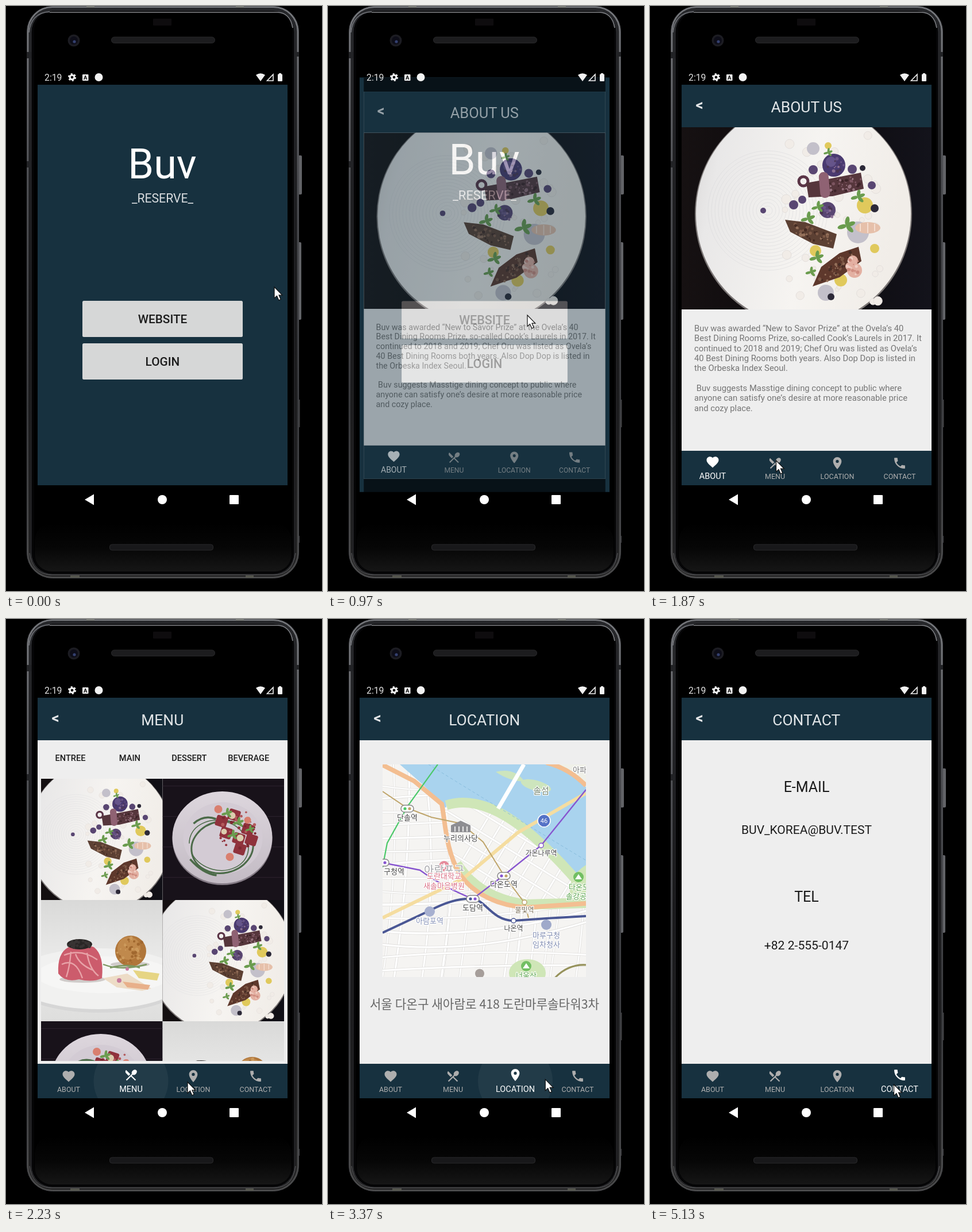
Write an HTML page that moves like this. It is 550x1018 px and loops after 5410 ms.

```html
<!DOCTYPE html>
<html lang="en">
<head>
<meta charset="utf-8">
<title>Restaurant app</title>
<style>
html, body { margin: 0; width: 100%; height: 100%; overflow: hidden; background: #000; }
svg { display: block; }
#stage { width: 550px; height: 1018px; font-family: Roboto, sans-serif; }
.mid { text-anchor: middle; }
.kr { font-family: "Noto Sans CJK KR", "Noto Sans CJK", sans-serif; text-anchor: middle; }
.halo { font-weight: 500; paint-order: stroke; stroke: #fff; stroke-width: 2.5px; stroke-linejoin: round; }
</style>
</head>
<body>
<svg id="stage" viewBox="0 0 550 1018"></svg>
<script>
const LOOP = 5410;
const NAVY = '#17313f', PAGE = '#eeeeee';
const ISLE = 'M205 318C270 296 345 345 449 468V500L345 497C290 490 250 465 222 425C206 392 210 350 205 318Z';
const stage = document.getElementById('stage');

// ---------- drawing helpers ----------
const rect = (x, y, w, h, fill, more = '') =>
  `<rect x="${x}" y="${y}" width="${w}" height="${h}" fill="${fill}" ${more}/>`;
const dot = (x, y, r, fill, more = '') => `<circle cx="${x}" cy="${y}" r="${r}" fill="${fill}" ${more}/>`;
const oval = (x, y, rx, ry, fill, more = '') =>
  `<ellipse cx="${x}" cy="${y}" rx="${rx}" ry="${ry}" fill="${fill}" ${more}/>`;
const shape = (d, fill, more = '') => `<path d="${d}" fill="${fill}" ${more}/>`;
const line = (d, color, w, more = '') =>
  `<path d="${d}" fill="none" stroke="${color}" stroke-width="${w}" ${more}/>`;
const text = (s, x, y, size, fill, more = 'class="mid"') =>
  `<text x="${x}" y="${y}" font-size="${size}" fill="${fill}" ${more}>${s}</text>`;
const dots = (fill, list) => list.map(([x, y, r]) => dot(x, y, r, fill)).join('');
const leaf = (x, y, size = 7) => [-80, -20, 45, 165].map(a =>
  oval(x + size * .8, y, size * .8, size * .38, '#6a9c4e', `transform="rotate(${a} ${x} ${y})"`)).join('');
const grad = (id, stops, dir = 'x2="0" y2="1"') =>
  `<linearGradient id="${id}" ${dir}>${stops.map(([o, c]) => `<stop offset="${o}" stop-color="${c}"/>`).join('')}</linearGradient>`;
const times = (n, f) => Array.from({ length: n }, (_, i) => f(i)).join('');
// A window onto part of a drawing; everything outside the box is cut off.
const crop = (x, y, w, h, id, box) =>
  `<svg x="${x}" y="${y}" width="${w}" height="${h}" viewBox="${box}" preserveAspectRatio="xMidYMin slice"><use href="#${id}"/></svg>`;

function random(seed) {
  return () => (seed = (seed * 16807) % 2147483647) / 2147483647;
}

// Small specks scattered inside a tilted ellipse.
function crumbs(seed, x, y, rx, ry, tilt, colors, n = 40) {
  const rnd = random(seed);
  const specks = times(n, i => {
    const a = rnd() * 6.283, d = Math.sqrt(rnd());
    return dot(Math.cos(a) * d * rx, Math.sin(a) * d * ry, 1 + rnd() * 2, colors[i % colors.length]);
  });
  return `<g transform="translate(${x} ${y}) rotate(${tilt})">${specks}</g>`;
}

// ---------- phone ----------
function phone() {
  return rect(508, 260, 7, 68, '#626367', 'rx="2"') + rect(508, 411, 6, 135, '#626367', 'rx="2"')
    + rect(508, 685, 3.5, 48, '#3c3c3e') + rect(508, 922, 3, 12, '#3c3c3e')
    + rect(36.5, .5, 473, 995, 'url(#rim)', 'rx="44" stroke="#4a4b4f"')
    + rect(39.5, 3, 467, 990, 'url(#side)', 'rx="41"')
    + rect(44, 8, 458, 981, '#050506', 'rx="37" stroke="#303135"')
    + rect(49, 11, 449, 972, '#000', 'rx="32"')
    + rect(50, 900, 447, 84, 'url(#chin)', 'rx="30"')
    + line('M76 11H472C486 11 496 20 499 38', '#85878b', 1.6)
    + line('M40 46C42 24 54 11 76 10', '#6b6d72', 2)
    + line('M41 952C44 977 58 989 78 990H468C488 989 501 977 504 952', '#4b4b4d', 1.5)
    + [80, 270].map(y => rect(36, y, 8, 11, '#222326')).join('') + rect(503, 80, 7, 8, '#222326')
    + [140, 400].map(x => rect(x, 0, 14, 3, '#7a7c78')).join('')
    + rect(112, 991, 16, 4, '#55564e') + rect(417, 991, 14, 4, '#55564e')
    + rect(256, 22, 32, 12, '#0e0c0e', 'rx="1"')
    + dot(118, 60, 10.5, '#1c1c22') + dot(118, 60, 7, '#0d0d18') + dot(119, 62, 2.6, '#34406f')
    + rect(183.5, 54, 180, 10.5, '#1c1c1e', 'rx="5" stroke="#29292b"')
    + rect(180.5, 937, 180, 10, '#18181a', 'rx="4" stroke="#29292b"');
}

function systemBars() {
  const white = '#f2f2f2';
  return text('2:19', 67, 130, 15.8, '#e2e2e2', '')
    + `<circle cx="115" cy="124" r="3.8" fill="none" stroke="${white}" stroke-width="3"/>`
    + `<circle cx="115" cy="124" r="6" fill="none" stroke="${white}" stroke-width="2.2" stroke-dasharray="3.1 3.18"/>`
    + rect(133, 119, 10.5, 11, white, 'rx="1"') + text('A', 138.2, 128, 9.5, '#000', 'class="mid" font-weight="700"')
    + dot(161.5, 124, 7, white)
    + shape('M435 120Q443 114.5 451 120L443 131Z', white)
    + line('M465 119V130H454.5Z', white, 1.6)
    + rect(473, 118.5, 8, 12.5, white, 'rx="1"') + rect(475, 117, 4, 2, white)
    + shape('M137 859L153 849.5V868.5Z', '#fff') + dot(272, 859, 8, '#fff') + rect(389, 851, 16, 16, '#fff', 'rx="1"');
}

// ---------- home ----------
function home() {
  const button = (y, label, id) => rect(133, y, 279, 63, '#d6d7d7', 'rx="2.5"')
    + (id ? rect(133, y, 279, 63, '#000', `rx="2.5" id="${id}" opacity="0"`) : '')
    + text(label, 272.5, y + 39, 20.8, '#1c1c1c', 'class="mid" font-weight="500"');
  return rect(55, 137, 435, 697, NAVY)
    + text('Buv', 272, 300, 72, '#fff')
    + text('_RESERVE_', 272.5, 342, 21.2, '#d8dcdf')
    + button(513, 'WEBSITE', 'press') + button(587, 'LOGIN');
}

// ---------- dishes ----------
function purpleDish() {
  const rnd = random(11);
  const purples = ['#6b5687', '#4b3653', '#8a6f92'], browns = ['#7c5846', '#452c24', '#94705a'];
  return rect(55, 211, 435, 317, 'url(#table)')
    + oval(267, 362, 189, 196, '#7b7675') + oval(267, 361, 187, 194, 'url(#plate)')
    + times(17, i => `<circle cx="205" cy="356" r="${8 + i * 6}" fill="none" stroke="#d6d6d8" stroke-width=".8" opacity=".6"/>`)
    + times(40, () => dot(235 + rnd() * 165, 225 + rnd() * 290, 3 + rnd() * 6, '#f1ece7', 'stroke="#e4dfdc"'))
    + dots('#c3c0ca', [[284, 248, 11], [362, 394, 19], [306, 499, 14]])
    + dots('#e0c95c', [[310, 243, 6], [374, 347, 14], [391, 422, 8], [288, 426, 10], [332, 477, 11]])
    + dots('#594672', [[284, 285, 8], [352, 284, 8], [386, 312, 7], [250, 346, 8], [265, 337, 7], [309, 355, 14], [197, 356, 5]])
    + dot(267, 305, 8, 'none', 'stroke="#5b3547" stroke-width="5"')
    + dot(320, 277, 20, '#4a3a70') + dot(315, 271, 9, '#65548a')
    + shape('M272 308L316 300L367 290L372 318L318 331L276 333Z', '#56363c')
    + crumbs(3, 338, 311, 32, 13, -12, ['#7c5560', '#3d2428', '#94707c'])
    + crumbs(4, 312, 357, 14, 12, 0, purples, 16) + crumbs(6, 322, 277, 17, 16, 0, purples, 14)
    + rect(295, 289, 17, 45, '#8f6273', 'rx="8" transform="rotate(-5 303 311)"')
    + shape('M235 372L270 376L325 397L319 422L284 414L244 393Z', '#5c4033')
    + crumbs(7, 281, 396, 38, 12, 20, browns)
    + shape('M283 488L298 454L330 430L363 419L368 444L330 472Z', '#5e382c')
    + crumbs(8, 325, 455, 40, 11, -40, browns)
    + oval(379, 386, 22, 10, '#e6c0aa') + line('M366 379V392M379 377V395M391 379V392', '#f4ddd0', 2)
    + dots('#e3b0a2', [[353, 443, 9], [356, 460, 13], [347, 453, 7]])
    + crumbs(9, 354, 453, 12, 16, 0, ['#f0cfc4', '#cf8d80'], 16)
    + dots('#2c2938', [[391, 352, 7], [315, 506, 6], [370, 282, 5]])
    + leaf(342, 382, 10) + leaf(275, 370, 8) + leaf(290, 438, 8) + leaf(362, 332, 8) + leaf(310, 255, 5) + leaf(292, 350, 7) + leaf(280, 463, 6);
}

function beetDish() {
  const beets = ['#7d2831', '#b35a5c', '#96343f'];
  return rect(0, 0, 212, 212, '#18121a') + times(4, i => rect(0, 12 + i * 53, 212, 1.2, '#2a202b'))
    + oval(104, 105, 87, 80, '#857c86') + oval(104, 102, 87, 80, 'url(#plate2)') + oval(105, 103, 69, 62, '#d3cbd4')
    + oval(104, 119, 54, 45, 'none', 'stroke="#4b6a48" stroke-width="3" transform="rotate(-12 104 119)"')
    + oval(98, 116, 52, 43, 'none', 'stroke="#4b6a48" stroke-width="1.6" stroke-dasharray="120 20" transform="rotate(14 98 116)"')
    + line('M54 78Q72 62 93 70M48 140Q70 165 94 168', '#4b6a48', 3.5)
    + [[96, 62], [118, 51], [126, 92], [142, 76], [104, 82], [148, 94], [128, 110]].map(([x, y]) =>
      rect(x, y, 20, 19, '#8f323c', `rx="3" transform="rotate(18 ${x} ${y})"`)).join('')
    + crumbs(13, 130, 88, 32, 36, 0, beets)
    + dots('#d97f6f', [[97, 53, 7], [117, 136, 7], [148, 72, 6]])
    + dots('#dccdae', [[121, 64, 6], [107, 92, 5], [135, 103, 6]])
    + leaf(112, 60, 6) + leaf(132, 76, 6) + leaf(122, 98, 6) + leaf(152, 88, 5);
}

function beefDish() {
  const rnd = random(5);
  return rect(0, 0, 212, 212, 'url(#wall)')
    + oval(100, 143, 150, 53, '#d6d6d6') + oval(100, 137, 150, 53, '#f1f1f0')
    + oval(110, 130, 118, 32, '#f6f6f5')
    + oval(72, 138, 40, 6, '#cfcbc9') + oval(155, 112, 34, 5, '#cfcbc9')
    + shape('M30 128Q28 92 48 82Q70 74 92 82Q110 96 106 136Q90 144 66 138Q42 144 30 128Z', '#cc5c6c')
    + line('M40 96Q70 84 98 104M36 112Q60 100 72 136M80 92Q84 120 100 132M52 90Q50 116 44 134M60 94Q66 112 90 122', '#e8a3a8', 2.4)
    + oval(67, 77, 22, 9, '#292625') + times(26, () => dot(48 + rnd() * 38, 70 + rnd() * 14, 2.4, '#383433'))
    + dot(156, 89, 27, '#b0763a') + dot(153, 84, 20, '#c0894c')
    + crumbs(17, 156, 88, 24, 24, 0, ['#cc9a5c', '#a1682f'])
    + line('M108 112Q140 124 184 112M120 118Q150 110 172 118', '#7b9760', 2.4)
    + shape('M108 136L150 128L192 154L176 158L132 152Z', '#eddcc6')
    + shape('M160 122L206 128L202 140L170 136Z', '#e6d584')
    + shape('M142 142L190 148L186 156L150 152Z', '#e8b08a')
    + dots('#c77a9d', [[136, 140, 4], [150, 120, 3]]);
}

// ---------- pages ----------
const copy = [
  'Buv was awarded “New to Savor Prize” at the Ovela’s 40',
  'Best Dining Rooms Prize, so-called Cook’s Laurels in 2017. It',
  'continued to 2018 and 2019; Chef Oru was listed as Ovela’s',
  '40 Best Dining Rooms both years. Also Dop Dop is listed in',
  'the Orbeska Index Seoul.', '',
  '\u00a0Buv suggests Masstige dining concept to public where',
  'anyone can satisfy one’s desire at more reasonable price',
  'and cozy place.'
];
const about = () => crop(55, 211, 435, 317, 'purple', '55 211 435 317')
  + copy.map((s, i) => text(s, 77, 566 + i * 17.35, 14.8, '#757575', '')).join('');

function menu() {
  const tile = (x, y, id, box, h = 211) => crop(x, y, 211.5, h, id, box);
  const square = '114 211 317 317', small = '0 0 211.5 211', strip = '0 0 211.5 69';
  return ['ENTREE', 'MAIN', 'DESSERT', 'BEVERAGE'].map((s, i) =>
    text(s, 112 + i * 103.4, 247, 14.6, '#1c1c1c', 'class="mid" font-weight="500"')).join('')
    + rect(61, 278, 423, 491, '#e4e4e4')
    + tile(61, 278, 'purple', square) + tile(272.5, 278, 'beet', small)
    + tile(61, 489, 'beef', small) + tile(272.5, 489, 'purple', square)
    + tile(61, 700, 'beet', strip, 69) + tile(272.5, 700, 'beef', strip, 69);
}

function cityMap() {
  const rnd = random(23);
  const street = (d, w) => line(d, '#e0dfdd', w + 1.6) + line(d, '#fff', w);
  const station = (x, y, a, b) => rect(x - 11, y - 6, 22, 12, '#fff', 'rx="6" stroke="#888" stroke-width="1.5"') + dot(x - 4, y, 2.6, a) + dot(x + 4, y, 2.6, b);
  const stop = (x, y, c) => dot(x, y, 4, '#fff', `stroke="${c}" stroke-width="1.5"`);
  const name = (s, x, y, size = 13, fill = '#444') => text(s, x, y, size, fill, 'class="kr halo"');
  const streets = times(16, i => {
    const x = 60 + i * 27, bend = rnd() * 40;
    return street(`M${x} 253Q${x + bend} 430 ${x - 30 + bend} 630`, 2 + rnd() * 2);
  }) + times(17, i => {
    const y = 290 + i * 23, bend = rnd() * 50;
    return street(`M90 ${y}Q260 ${y + 30 - bend} 455 ${y - 50 + bend}`, 2 + rnd() * 2);
  });
  const blocks = times(9, i => street(`M${180 + i * 30} 510L${300 + i * 30} 310`, 3))
    + times(7, i => street(`M190 ${290 + i * 34}L450 ${450 + i * 34}`, 3));
  return `<svg x="95" y="253" width="354" height="370" viewBox="95 253 354 370">`
    + rect(95, 253, 354, 370, '#f5f4f2') + streets
    + shape('M125 253H400L449 292V474C390 395 300 310 204 328L165 288Z', '#a9d3ee')
    + shape('M400 253H449V284Q420 276 400 253Z', '#eff0e8')
    + shape(ISLE, '#f5f4f1') + `<g clip-path="url(#isle)">${blocks}</g>`
    + line('M206 324C270 304 345 350 449 474', '#cfe6b7', 17) + line('M224 426C250 467 290 490 345 497L449 494', '#cfe6b7', 18)
    + oval(362, 290, 27, 9, '#cde5bd', 'transform="rotate(15 362 290)"')
    + shape('M292 266Q325 258 342 283Q315 282 292 266Z', '#cde5bd')
    + oval(347, 616, 32, 24, '#cfe6b7') + shape('M449 428Q418 448 421 478L449 490Z', '#cfe6b7')
    + line('M175 253Q250 300 449 420', '#88bddd', 1, 'stroke-dasharray="5 4"')
    + line('M341 253L296 330', '#fff', 7) + line('M449 303L330 372L235 452L95 520', '#f5dda0', 6)
    + line('M95 254L150 282L198 322C205 360 205 400 228 442C255 482 300 499 345 502L449 495M380 250Q420 260 449 290', '#f3be91', 8)
    + line('M95 300L138 329L180 345L232 356L270 388L306 446L342 494L349 520', '#bfa56b', 2)
    + line('M191 253L139 325L103 390L95 432', '#4cc96a', 2.2)
    + line('M95 424L160 437Q200 466 252 487L306 446L371 394L449 297', '#8755cf', 2.4)
    + line('M95 546L178 507Q220 485 252 487C275 490 285 524 323 525L380 521L449 517', '#4a5794', 4)
    + line('M390 630Q415 600 449 602', '#96925b', 3)
    + station(138, 330, '#4cc96a', '#bfa56b') + station(306, 447, '#8755cf', '#bfa56b') + station(252, 487, '#4a5794', '#8755cf')
    + station(95, 424, '#8755cf', '#8755cf') + stop(371, 394, '#8755cf') + stop(342, 493, '#bfa56b') + stop(323, 525, '#4a5794')
    + dot(376, 351, 11, '#5572c6', 'stroke="#fff" stroke-width="1.5"') + text('46', 376, 355, 11, '#fff')
    + shape('M214 359L231 351L248 359V371H214Z', '#8e8e92') + line('M221 361V370M228 361V370M235 361V370M242 361V370', '#e6e6e6', 2)
    + dot(202, 430, 9, '#e58b9b') + line('M202 425V435M197 430H207', '#fff', 2.5)
    + dot(177, 509, 9, '#a7b0d0') + dot(380, 532, 9, '#9fa9ca') + dot(264, 617, 8, '#a69e9a')
    + dot(436, 449, 9, '#72bf63') + dot(345, 604, 9, '#72bf63') + shape('M339 608L345 599L351 608Z', '#fff') + shape('M430 453L436 444L442 453Z', '#fff')
    + name('아파', 438, 267, 13, '#777') + name('솔섬', 371, 304, 15, '#74856f') + name('단솔역', 138, 350) + name('누리의사당', 231, 386)
    + name('가온나루역', 371, 412, 12) + name('구청역', 115, 444) + name('아람포구', 202, 444, 19, '#a4a4a8')
    + name('도란대학교', 202, 452, 13, '#d96f84') + name('새솔마음병원', 202, 469, 13, '#d96f84')
    + name('다온도역', 306, 466) + name('도담역', 252, 507) + name('물빛역', 342, 511, 12, '#766b55')
    + name('아람포역', 177, 530, 13, '#8793b8') + name('나온역', 323, 543, 12)
    + name('마루구청', 380, 555, 13, '#7f8bb0') + name('임차청사', 380, 571, 13, '#7f8bb0')
    + name('다온도', 437, 471, 13, '#57a34a') + name('솔강공', 432, 487, 13, '#57a34a') + name('너울산', 345, 625, 13, '#57a34a')
    + '</svg>';
}
const place = () => cityMap() + text('서울 다온구 새아람로 418 도란마루솔타워3차', 272.5, 678, 21.3, '#666', 'class="kr"');

const contact = () => text('E-MAIL', 272.5, 301, 25, '#1a1a1a') + text('BUV_KOREA@BUV.TEST', 272.5, 374, 21, '#1a1a1a')
  + text('TEL', 272.5, 492, 25, '#1a1a1a') + text('+82 2-555-0147', 272.5, 575, 21.1, '#1a1a1a');

// ---------- tabs ----------
const tabs = [
  { label: 'ABOUT', title: 'ABOUT US', x: 109, from: 0, body: about,
    icon: 'M12 21.35l-1.45-1.32C5.4 15.36 2 12.28 2 8.5 2 5.42 4.42 3 7.5 3c1.74 0 3.41.81 4.5 2.09C13.09 3.81 14.76 3 16.5 3 19.58 3 22 5.42 22 8.5c0 3.78-3.4 6.86-8.55 11.54z' },
  { label: 'MENU', title: 'MENU', x: 217.5, from: 2000, tap: 1870, body: menu,
    icon: 'M8.1 13.34l2.83-2.83L3.91 3.5c-1.56 1.56-1.56 4.09 0 5.66zm6.78-1.81c1.53.71 3.68.21 5.27-1.38 1.91-1.91 2.28-4.65.81-6.12-1.46-1.46-4.2-1.1-6.12.81-1.59 1.59-2.09 3.74-1.38 5.27L3.7 19.87l1.41 1.41L12 14.41l6.88 6.88 1.41-1.41L13.41 13z' },
  { label: 'LOCATION', title: 'LOCATION', x: 326, from: 3130, tap: 3000, body: place,
    icon: 'M12 2C8.13 2 5 5.13 5 9c0 5.25 7 13 7 13s7-7.75 7-13c0-3.87-3.13-7-7-7zm0 9.5a2.5 2.5 0 0 1 0-5 2.5 2.5 0 0 1 0 5z' },
  { label: 'CONTACT', title: 'CONTACT', x: 434.5, from: 5000, tap: 4870, body: contact,
    icon: 'M6.62 10.79c1.44 2.83 3.76 5.14 6.59 6.59l2.2-2.2c.27-.27.67-.36 1.02-.24 1.12.37 2.33.57 3.57.57.55 0 1 .45 1 1V20c0 .55-.45 1-1 1-9.39 0-17-7.61-17-17 0-.55.45-1 1-1h3.5c.55 0 1 .45 1 1 0 1.25.2 2.45.57 3.57.11.35.03.74-.25 1.02z' }
];
tabs.forEach((tab, i) => { tab.to = i < 3 ? tabs[i + 1].from : LOOP + 1000; });

const app = () => rect(55, 112, 435, 772, '#000') + rect(55, 137, 435, 697, PAGE) + rect(55, 137, 435, 74, NAVY)
  + text('&lt;', 86, 180.5, 26, '#e4e6e8', 'class="mid" font-weight="700"')
  + tabs.map(t => `<g class="page">${text(t.title, 272.3, 185, 26.4, '#e2e6e8')}${t.body()}</g>`).join('')
  + rect(55, 774, 435, 60, NAVY)
  + tabs.map(t => `<circle class="ripple" cx="${t.x}" cy="804" fill="#fff" clip-path="url(#bar)"/>`
    + `<g class="tab">${shape(t.icon, 'inherit')}${text(t.label, t.x, 823, 12.5, 'inherit')}</g>`).join('');

stage.innerHTML = `<defs>
  ${grad('rim', [[0, '#7b7d81'], [.3, '#4c4d51'], [.7, '#303134'], [1, '#4a4a4a']])}
  ${grad('side', [[0, '#26272a'], [.5, '#18181a'], [1, '#202021']])}
  ${grad('chin', [[0, '#000'], [.5, '#060606'], [1, '#161616']])}
  ${grad('table', [[0, '#161112'], [.5, '#0c090c'], [1, '#13131b']], 'x2="1" y2="0"')}
  ${grad('plate', [[0, '#d9d7d7'], [.15, '#e9e8e8'], [.6, '#f6f4f1'], [1, '#f1ede8']], 'x2="1" y2=".2"')}
  ${grad('plate2', [[0, '#ddd6dd'], [1, '#c3bbc4']])}
  ${grad('wall', [[0, '#d9d9d8'], [.45, '#e9e9e8'], [1, '#dededd']])}
  <clipPath id="screen">${rect(55, 112, 435, 736, '#000')}</clipPath>
  <clipPath id="bar">${rect(55, 774, 435, 60, '#000')}</clipPath>
  <clipPath id="isle">${shape(ISLE, '#000')}</clipPath>
  <g id="purple">${purpleDish()}</g><g id="beet">${beetDish()}</g><g id="beef">${beefDish()}</g>
  </defs>${rect(0, 0, 550, 1018, '#000')}${phone()}
  <g clip-path="url(#screen)"><g id="home">${home()}</g><g id="app">${app()}</g></g>
  ${systemBars()}
  <path id="cursor" d="M0 0V19.5L4.5 15.4L7.8 23L11.2 21.5L8 14.2H13.8Z" fill="#fff" stroke="#111" stroke-width="1.2"/>`;

// ---------- motion ----------
const $ = id => document.getElementById(id);
const all = c => [...stage.querySelectorAll('.' + c)];
const el = { home: $('home'), app: $('app'), press: $('press'), cursor: $('cursor'), pages: all('page'), tabs: all('tab'), ripples: all('ripple') };
const clamp = v => Math.min(1, Math.max(0, v));
const span = (t, a, b) => clamp((t - a) / (b - a));
const smooth = p => p * p * (3 - 2 * p);
const bezier = (a, b, c, d, u) => a * (1 - u) ** 3 + 3 * b * u * (1 - u) ** 2 + 3 * c * u * u * (1 - u) + d * u ** 3;

// Two joined curves: a quick start, then a long settle.
function settle(p) {
  const [xs, ys] = p < 1 / 6 ? [[0, .05, .1333, .1667], [0, 0, .06, .4]] : [[.1667, .2083, .25, 1], [.4, .82, 1, 1]];
  let lo = 0, hi = 1;
  for (let i = 0; i < 20; i++) {
    const mid = (lo + hi) / 2;
    if (bezier(...xs, mid) < p) lo = mid; else hi = mid;
  }
  return bezier(...ys, lo);
}

const trail = [[170, 467, 489], [700, 347, 538], [1300, 347, 538], [1800, 219.5, 791], [2000, 219.5, 791],
  [2300, 331, 808], [3150, 331, 808], [3530, 407, 797], [3800, 424.5, 810]];
function pointer(t) {
  const i = trail.findIndex(k => k[0] > t);
  if (i < 1) return (i ? trail[trail.length - 1] : trail[0]).slice(1);
  const [t0, x0, y0] = trail[i - 1], [t1, x1, y1] = trail[i];
  const p = smooth(span(t, t0, t1));
  return [x0 + (x1 - x0) * p, y0 + (y1 - y0) * p];
}

const zoom = s => `translate(272.5 498) scale(${s}) translate(-272.5 -498)`;

function draw(t) {
  const open = settle(span(t, 870, 1270));
  el.press.setAttribute('opacity', .11 * span(t, 730, 820));
  el.home.setAttribute('transform', zoom(1 + .045 * open));
  el.app.setAttribute('transform', zoom(.85 + .15 * open));
  el.app.setAttribute('opacity', span(t, 920, 1003));

  tabs.forEach((tab, i) => {
    el.pages[i].setAttribute('display', t >= tab.from && t < tab.to ? 'inline' : 'none');
    const on = (i ? span(t, tab.from, tab.from + 115) : 1) - span(t, tab.to, tab.to + 115);
    const [icon, label] = el.tabs[i].children;
    const grey = Math.round(174 + 81 * on);
    el.tabs[i].setAttribute('fill', `rgb(${grey},${grey},${grey})`);
    icon.setAttribute('transform', `translate(${tab.x - 12.6} ${783 - 2 * on}) scale(1.05)`);
    label.setAttribute('font-size', 12.5 + 2 * on);
    const live = tab.tap && t >= tab.tap;
    el.ripples[i].setAttribute('r', live ? 65 * smooth(span(t, tab.tap, tab.tap + 225)) : 0);
    el.ripples[i].setAttribute('opacity', live ? .1 * (1 - span(t, tab.tap + 150, tab.tap + (i < 3 ? 560 : 260))) : 0);
  });

  el.cursor.setAttribute('transform', `translate(${pointer(t)})`);
}

const start = performance.now();
(function tick() {
  draw((performance.now() - start) % LOOP);
  requestAnimationFrame(tick);
})();
</script>
</body>
</html>
```
